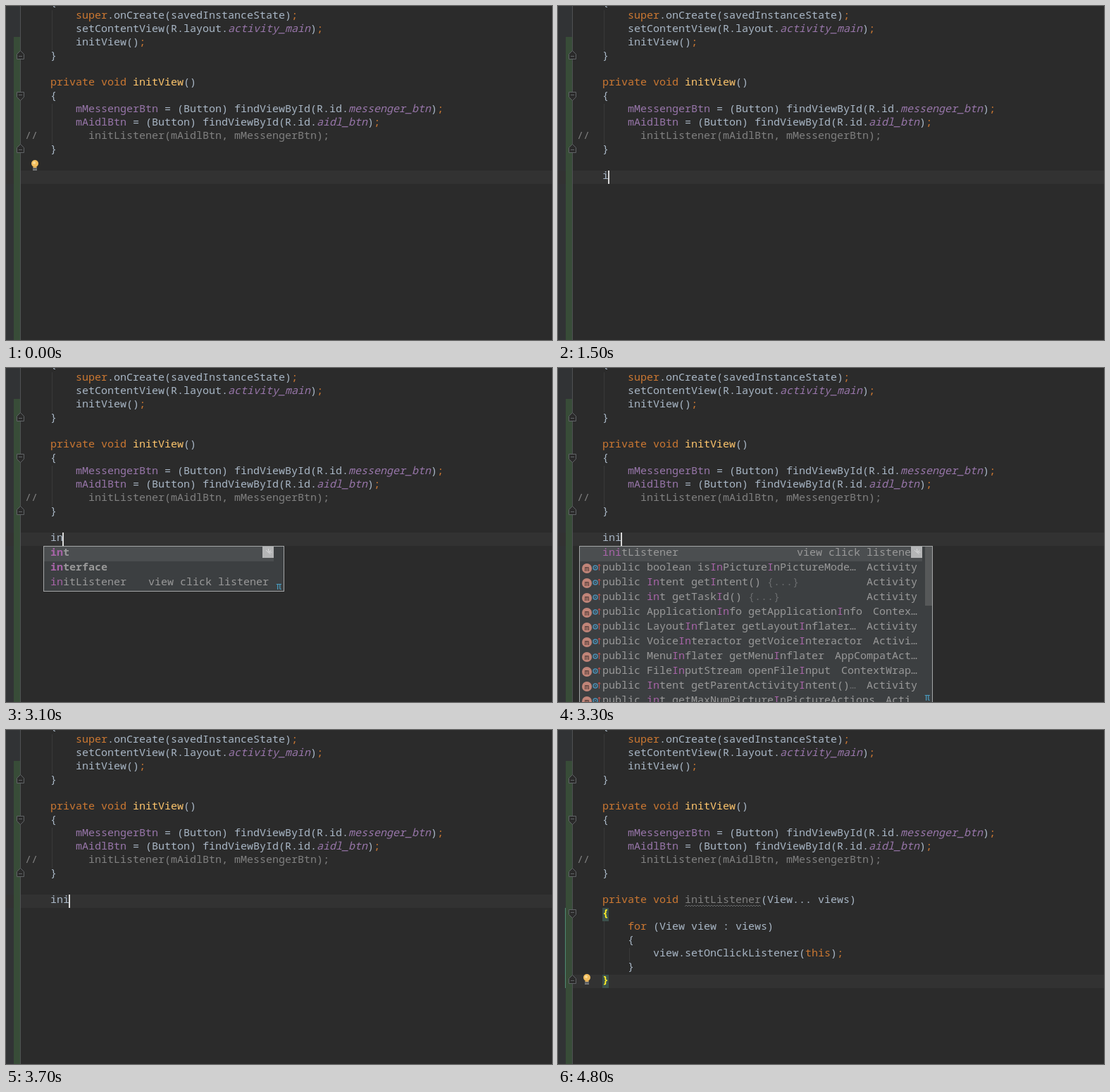
An HTML page that plays this animation: 775 px wide and 475 px high, repeating every 4900 ms.

```html
<!DOCTYPE html>
<html>
<head>
<meta charset="utf-8">
<style>
html, body { margin: 0; width: 100%; height: 100%; overflow: hidden; background: #2b2b2b }
svg { display: block }
text { font: 15px "Noto Sans Mono", "DejaVu Sans Mono", monospace; white-space: pre; fill: #a9b7c6 }
.key { fill: #cc7832 }
.field { fill: #9876aa }
.res { fill: #9876aa; font-style: italic }
.decl { fill: #ffc66d }
.note, .unused { fill: #808080 }
.brace { fill: #ffef28; font-weight: bold }
.item { fill: #999 }
.bold { font-weight: bold }
.hit { fill: #a864a8 }
.faint { fill: #6a6c6e }
.pi { fill: #4a9cc0; font-size: 14px }
</style>
</head>
<body>
<svg id="stage" width="775" height="475" viewBox="0 0 775 475"></svg>
<script>
const LOOP = 4900, COL = 9, LEFT = 27, ROW = 19, TOP = 234;
const stage = document.getElementById('stage');

const rect = (x, y, w, h, fill, more = '') =>
  `<rect x="${x}" y="${y}" width="${w}" height="${h}" fill="${fill}" ${more}/>`;
const text = (x, y, s, cls = '', more = '') => `<text x="${x}" y="${y}" class="${cls}" ${more}>${s}</text>`;
const span = (cls, s) => `<tspan class="${cls}">${s}</tspan>`;
const path = (d, stroke, fill = 'none') => `<path d="${d}" stroke="${stroke}" fill="${fill}"/>`;

const TOKENS = /(\/\/.*)|(\b(?:private|void|super|for|this)\b|;)|(\b[a-z]+_[a-z]+\b)|(\bm[A-Z]\w*)|((?<=void )\w+)/g;
const CLASSES = ['note', 'key', 'res', 'field', 'decl'];
const color = s => s.replace(TOKENS, (m, ...g) => span(CLASSES[g.findIndex((v, i) => i < 5 && v)], m));

const code = (lines, top, paint = color) =>
  lines.map((s, i) => text(LEFT, top + i * ROW + 12, paint(s))).join('');

const HEAD = [
  '    {',
  '        super.onCreate(savedInstanceState);',
  '        setContentView(R.layout.activity_main);',
  '        initView();',
  '    }',
  '',
  '    private void initView()',
  '    {',
  '        mMessengerBtn = (Button) findViewById(R.id.messenger_btn);',
  '        mAidlBtn = (Button) findViewById(R.id.aidl_btn);',
  '//        initListener(mAidlBtn, mMessengerBtn);',
  '    }'
];
const BODY = [
  '    private void initListener(View... views)',
  '    {',
  '        for (View view : views)',
  '        {',
  '            view.setOnClickListener(this);',
  '        }',
  '    }'
];
const ITEMS = [
  ['public boolean isInPictureInPictureMode…', 'Activity'],
  ['public Intent getIntent() {...}', 'Activity'],
  ['public int getTaskId() {...}', 'Activity'],
  ['public ApplicationInfo getApplicationInfo', 'Contex…'],
  ['public LayoutInflater getLayoutInflater…', 'Activity'],
  ['public VoiceInteractor getVoiceInteractor', 'Activi…'],
  ['public MenuInflater getMenuInflater', 'AppCompatAct…'],
  ['public FileInputStream openFileInput', 'ContextWrap…'],
  ['public Intent getParentActivityIntent()…', 'Activity'],
  ['public int getMaxNumPictureInPictureActions', 'Acti…']
];

// [start time, typed text]
const TYPING = [[0, ''], [1500, 'i'], [1700, 'ii'], [1800, 'iin'], [2500, 'ii'], [2600, 'i'],
  [2700, ''], [2800, 'i'], [2900, 'in'], [3200, 'ini']];

const guide = (x, y, h) => rect(x, y, 1, h, '#393939');

function fold(top, up) {
  const y = top + (up ? .5 : 14.5), d = up ? 1 : -1;
  return path(`M20.5 ${y}l5 ${5 * d}v${7 * d}h-10v${-7 * d}zM18 ${y + 8 * d}h5`, '#606366', '#2b2b2b');
}

function bulb(y) {
  return `<circle cx="41" cy="${y + 5}" r="5" fill="#f2bd5c"/>` +
    `<circle cx="40" cy="${y + 4}" r="2" fill="#fbdc9a"/>` +
    rect(38.5, y + 9, 5, 2, '#e0ad55') + rect(38, y + 11, 6, 4, '#77797b') +
    rect(38, y + 12, 6, 1, '#4a4c4e');
}

const caret = (col, top) => {
  const x = Math.max(LEFT, LEFT + col * COL - 1);
  return rect(x, top, LEFT + col * COL + 1 - x, ROW, '#d8d8d8');
};

const box = (x, w, h) => rect(x + .5, 253.5, w - 1, h - 1, '#3c3f41', 'stroke="#a4a6a7"');
const loader = x => rect(x, 254, 16, 16, '#b4b5b6') +
  path(`M${x + 8.5} 257v4m0 1l4 -3m-4 3h5m-5 0l3 3M${x + 5} 259l3 3`, '#d6d7d8');

function smallPopup(loading) {
  return box(53, 342, 65) + rect(54, 254, 326, 21, '#4b4e50') +
    text(63, 267, span('hit', 'in') + 't', 'item bold') +
    text(63, 288, span('hit', 'in') + 'terface', 'item bold') +
    text(63, 309, span('hit', 'in') + 'itListener', 'item') +
    text(373, 309, 'view click listener', 'item', 'text-anchor="end"') +
    (loading ? loader(364) : '') + text(383, 315, 'π', 'pi');
}

function methodIcon(y) {
  return `<circle cx="41" cy="${y}" r="7" fill="#c08478"/>` +
    text(41, y + 3.5, 'm', '', 'text-anchor="middle" style="font-size:11px;fill:#382c2a"') +
    `<circle cx="53" cy="${y - 1}" r="3" fill="none" stroke="#4a8fb4" stroke-width="1.5"/>` +
    `<circle cx="53" cy="${y - 1}" r="1" fill="#4a8fb4"/>` +
    path(`M58.5 ${y + 3}v-9m-2 2.5l2 -2.5l2 2.5`, '#b9524c');
}

function bigPopup(loading) {
  const mark = s => s.replace(/([Ii]n)(.*?)(I)/, (m, a, b, c) => span('hit', a) + b + span('hit', c))
    .replace(/\{\.\.\.\}|(?<=\))…/, m => span('faint', m));
  const rows = ITEMS.map(([name, owner], i) => {
    const y = 288 + i * 21;
    return methodIcon(y - 3) + text(63, y, mark(name), 'item') +
      text(510, y, owner, 'item', 'text-anchor="end"');
  });
  return box(30, 502, 240) + rect(31, 254, 486, 21, '#4b4e50') +
    rect(521, 254, 10, 84, '#565859') +
    text(63, 267, span('hit', 'ini') + 'tListener', 'item') +
    text(510, 267, 'view click listener', 'item', 'text-anchor="end"') +
    rows.join('') + (loading ? loader(501) : '') + text(520, 473, 'π', 'pi');
}

function method(t) {
  const marked = t >= 4000;
  let out = '';
  if (marked) {
    out += guide(65, 272, 76) + guide(101, 310, 19) +
      rect(63, 253, 9, ROW, '#3b514d') + rect(63, 348, 9, ROW, '#3b514d');
  }
  const paint = s => {
    if (t < 3900) return s;
    if (marked && /^ {4}[{}]$/.test(s)) return span('brace', s);
    return t < 4200 ? color(s) : color(s).replace('decl', 'unused');
  };
  out += code(BODY, TOP, paint);
  if (t >= 4200) out += path('M180 251' + 'l2 -2l2 2'.repeat(27), '#66686a');
  return out;
}

function draw(t) {
  const done = t >= 3800, marked = t >= 4000;
  const line = done ? 348 : TOP;
  const typed = TYPING.filter(k => k[0] <= t).pop()[1];

  let out = rect(0, 0, 775, 475, '#2b2b2b') + rect(0, 0, 20, 475, '#313335') +
    rect(0, line, 775, ROW, '#323232') + rect(11, 44, 9, 431, '#384c38');
  if (marked) out += rect(10, 253, 1, 114, '#4f8a72');
  out += rect(20, 0, 1, 475, '#505254') + guide(65, 6, 57) + guide(65, 139, 57) +
    fold(63, true) + fold(120, false) + fold(196, true) + code(HEAD, -13);
  if (marked) out += fold(253, false) + fold(348, true);

  if (done) out += method(t);
  else out += text(63, TOP + 12, typed);

  if (t < 400) out += bulb(219);
  else if (t < 700) out += bulb(257);
  else if (t >= 4600) out += bulb(347);

  if (done) out += t < 4800 ? caret(5, line) : '';
  else if (t >= 400) out += caret(t < 700 ? 0 : 4 + typed.length, line);

  if (t >= 3000 && t < 3300) out += smallPopup(t >= 3100);
  else if (t >= 3300 && t < 3700) out += bigPopup(t < 3400);
  return out;
}

let last = -1;
function tick() {
  const t = Math.floor(performance.now() % LOOP / 100) * 100;
  if (t !== last) stage.innerHTML = draw(last = t);
  requestAnimationFrame(tick);
}
tick();
</script>
</body>
</html>
```
